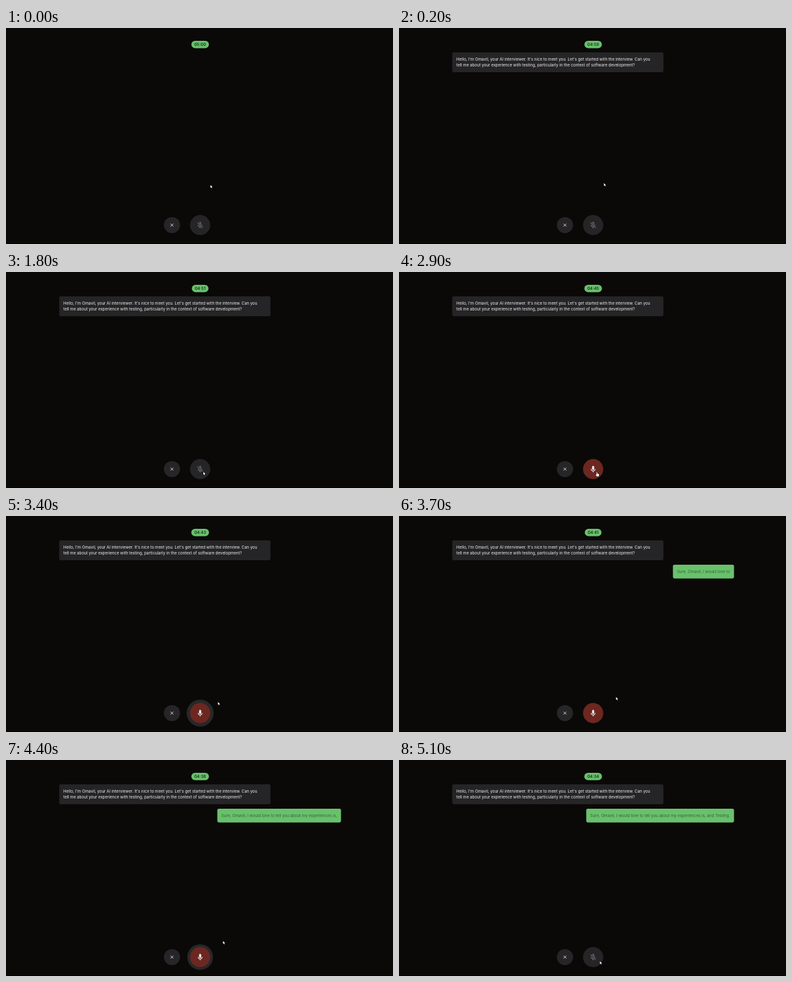
An HTML page with a canvas that plays this animation: 600 px wide and 337 px high, repeating every 5200 ms.

```html
<!DOCTYPE html>
<html lang="en">
<head>
<meta charset="utf-8">
<title>Interview call</title>
<style>
html, body { margin: 0; width: 100%; height: 100%; overflow: hidden; background: #0a0907; }
canvas { display: block; width: 600px; height: 337px; }
</style>
</head>
<body>
<canvas id="stage"></canvas>
<script>
const W = 600, H = 337, LOOP = 5200, STEP = 100;
const canvas = document.getElementById('stage');
const ctx = canvas.getContext('2d');
const ratio = window.devicePixelRatio || 1;
canvas.width = Math.round(W * ratio);
canvas.height = Math.round(H * ratio);

const GREEN = '#69c16c', GREY = '#252426', WHITE = '#f4f4f4';
const FONT = '6.17px Inter, sans-serif';
const MIC = { x: 301, y: 307.5, r: 15.7 };
const MIC_ON = 2300, MIC_OFF = 5000;

const question = [
  "Hello, I'm Omavil, your AI interviewer. It's nice to meet you. Let's get started with the interview. Can you",
  'tell me about your experience with testing, particularly in the context of software development?'
];

// The spoken reply grows as it is recognised.
const reply = [
  [3700, 'Sure, Omavil, I would love to'],
  [3900, ' tell you'],
  [4100, ' about my experiences'],
  [4300, ' is,'],
  [4700, ' and Testing.']
];

// Pointer moves: start, end, from, to
const moves = [
  [0, 300, [317, 245], [318, 241]],
  [1400, 1800, [318, 241], [306, 312]],
  [3000, 3600, [306, 312], [336.5, 282.5]],
  [4500, 4800, [336.5, 282.5], [311.5, 314]]
];

// Voice level as ring radius, one value per step from 3100 ms
const voice = [19, 23, 25, 21, 24, 18, 0, 19, 23, 20, 22, 18, 17, 20, 18, 19, 17, 0];

const micPath = new Path2D('M12 14c1.66 0 3-1.34 3-3V5c0-1.66-1.34-3-3-3S9 3.34 9 5v6c0 1.66 1.34 3 3 3z' +
  'M17 11c0 2.76-2.24 5-5 5s-5-2.24-5-5H5c0 3.53 2.61 6.43 6 6.92V21h2v-3.08c3.39-.49 6-3.39 6-6.92h-2z');
const micOutline = new Path2D('M12 3c-1.2 0-2 .9-2 2v6a2 2 0 0 0 4 0V5c0-1.1-.8-2-2-2z' +
  'M6 11a6 6 0 0 0 12 0M12 17v4');
const slash = new Path2D('M4 4L20 20');
const arrow = new Path2D('M0 0V4.3L1 3.4L1.7 5L2.5 4.7L1.8 3.1H3.1Z');
const hand = new Path2D('M1 .6Q1.7-.2 2.1.7V2.6L4.4 3.2Q5 3.5 4.8 4.4L4.2 7H1.6L-.2 4.7Q-.3 3.7 1 4.3Z');

function disc(x, y, r, color) {
  ctx.fillStyle = color;
  ctx.beginPath();
  ctx.arc(x, y, r, 0, Math.PI * 2);
  ctx.fill();
}

function box(x, y, w, h, r, color) {
  ctx.fillStyle = color;
  ctx.beginPath();
  ctx.roundRect(x, y, w, h, r);
  ctx.fill();
}

function label(text, x, y, color, align = 'left') {
  ctx.fillStyle = color;
  ctx.textAlign = align;
  ctx.fillText(text, x, y);
}

function drawTimer(t) {
  const left = 300 - Math.floor(t / 200 + 0.5);
  const pad = n => String(n).padStart(2, '0');
  const text = pad(Math.floor(left / 60)) + ':' + pad(left % 60);
  ctx.font = '600 ' + FONT;
  const w = ctx.measureText(text).width + 9.3;
  box(301 - w / 2, 19.9, w, 11.6, 5.8, GREEN);
  label(text, 301, 27.9, '#17351a', 'center');
}

function drawChat(t) {
  ctx.font = FONT;
  if (t >= 200) {
    box(82.5, 38, 327.5, 31.1, 2.4, GREY);
    question.forEach((line, i) => label(line, 89, 50.8 + i * 9.3, WHITE));
  }
  const said = reply.filter(([at]) => t >= at).map(([, words]) => words).join('');
  if (said) {
    const w = ctx.measureText(said).width + 12.4;
    box(519.4 - w, 75.9, w, 21.6, 2.4, GREEN);
    label(said, 513.2, 89, '#30633a', 'right');
  }
}

function drawClose() {
  disc(257.3, 307.5, 12.6, '#262527');
  ctx.strokeStyle = WHITE;
  ctx.lineWidth = 0.9;
  ctx.beginPath();
  for (const s of [-1, 1]) {
    ctx.moveTo(257.3 - 2.1, 307.5 - 2.1 * s);
    ctx.lineTo(257.3 + 2.1, 307.5 + 2.1 * s);
  }
  ctx.stroke();
}

function drawMic(t, on) {
  const level = on ? voice[(t - 3100) / STEP] || 0 : 0;
  if (level) disc(MIC.x, MIC.y, level, '#282729');
  disc(MIC.x, MIC.y, MIC.r, on ? '#6c2720' : '#252426');

  ctx.save();
  ctx.translate(MIC.x - 6.3, MIC.y - 6.1);
  ctx.scale(0.525, 0.525);
  if (on) {
    ctx.fillStyle = WHITE;
    ctx.fill(micPath);
  } else {
    ctx.strokeStyle = '#929193';
    ctx.lineWidth = 1.7;
    ctx.stroke(micOutline);
    ctx.strokeStyle = '#252426';
    ctx.lineWidth = 4;
    ctx.stroke(slash);
    ctx.strokeStyle = '#929193';
    ctx.lineWidth = 1.8;
    ctx.stroke(slash);
  }
  ctx.restore();
}

function pointerAt(t) {
  let [x, y] = moves[0][2];
  for (const [start, end, from, to] of moves) {
    if (t < start) break;
    const p = Math.min(1, (t - start) / (end - start));
    const e = p * p * (3 - 2 * p);
    x = from[0] + (to[0] - from[0]) * e;
    y = from[1] + (to[1] - from[1]) * e;
  }
  return [x, y];
}

function drawPointer(t, on) {
  const [x, y] = pointerAt(t);
  const shape = on && Math.hypot(x - MIC.x, y - MIC.y) < MIC.r ? hand : arrow;
  ctx.save();
  ctx.translate(x - (shape === hand ? 0.7 : 0), y);
  ctx.strokeStyle = '#111';
  ctx.lineWidth = 0.8;
  ctx.stroke(shape);
  ctx.fillStyle = '#fff';
  ctx.fill(shape);
  ctx.restore();
}

function draw(t) {
  const on = t >= MIC_ON && t < MIC_OFF;
  ctx.setTransform(ratio, 0, 0, ratio, 0, 0);
  ctx.fillStyle = '#0a0907';
  ctx.fillRect(0, 0, W, H);
  ctx.fillStyle = '#000';
  ctx.fillRect(0, 336, W, 1);
  drawTimer(t);
  drawChat(t);
  drawClose();
  drawMic(t, on);
  drawPointer(t, on);
}

const begin = performance.now();
function tick() {
  const t = (performance.now() - begin) % LOOP;
  draw(Math.floor(t / STEP) * STEP);
  requestAnimationFrame(tick);
}
tick();
</script>
</body>
</html>
```
